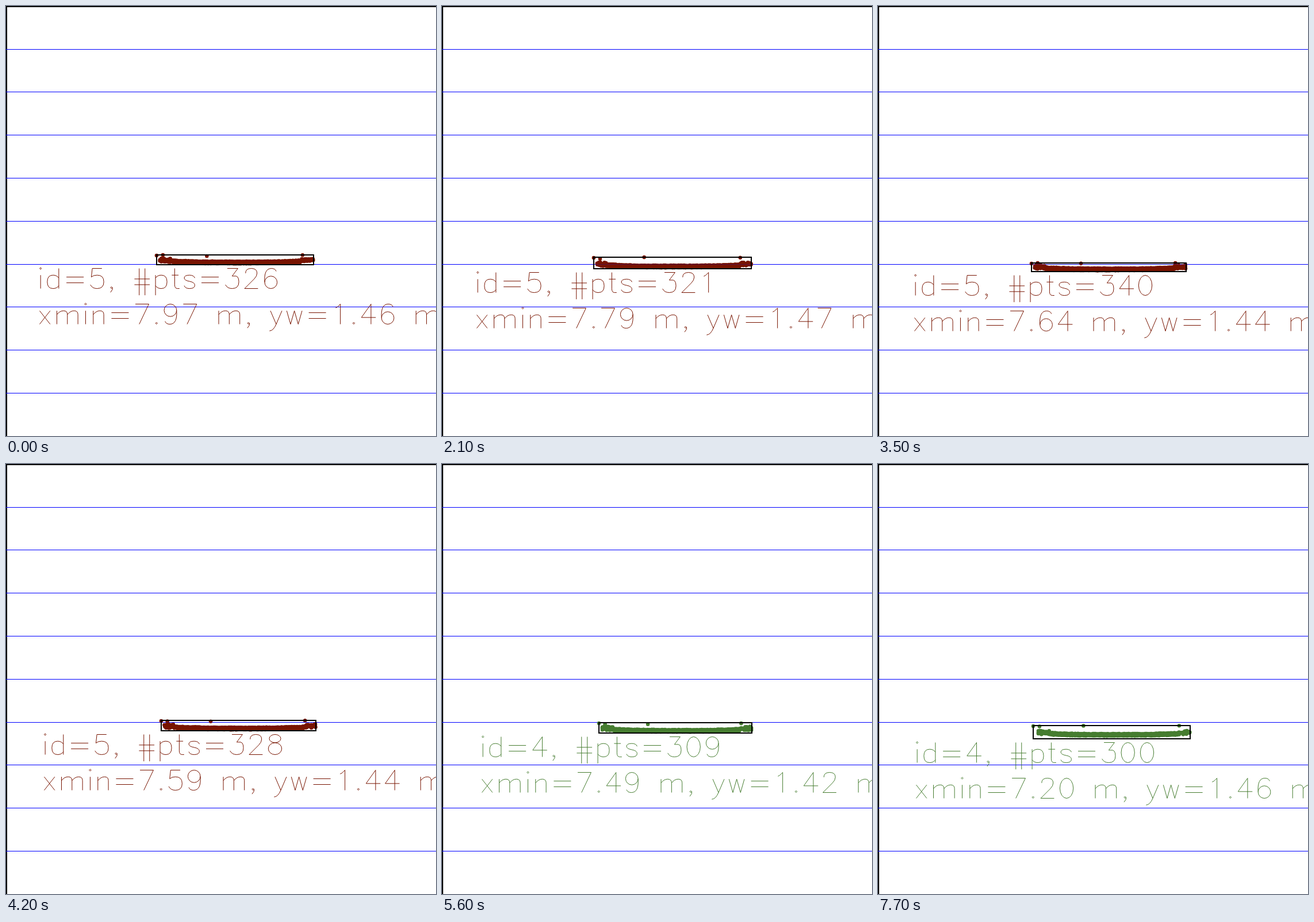
These frames come from a looping animation (748 px wide and 748 px high, 8 s). An HTML page with a canvas:

```html
<!DOCTYPE html>
<html lang="en">
<head>
<meta charset="utf-8">
<title>Lidar top view</title>
<style>
html, body { margin: 0; width: 100%; height: 100%; overflow: hidden; background: #fff; }
canvas { display: block; }
</style>
</head>
<body>
<canvas id="view" width="748" height="748"></canvas>
<script>
const SIZE = 748, STEP = 700, LOOP = 8000, RADIUS = 3.3, TEXT_SCALE = 1.666;
const canvas = document.getElementById('view');
const ctx = canvas.getContext('2d');

// Single-stroke lettering: baseline at y = 0, capitals 21 units high.
const oval = (x, y, rx, ry = rx) =>
  `M${x - rx} ${y}a${rx} ${ry} 0 1 0 ${2 * rx} 0a${rx} ${ry} 0 1 0 ${-2 * rx} 0`;
const diamond = y => `M5 ${y}l-1 1 1 1 1-1z`;
const stem = 'M4-14V0';
const arch = stem + 'M4-10Q7-14 11-14Q15-14 15-10V0';
const hook = 'Q17-14 17-7Q17 0 10 0Q5 0 3-4';
const digits = [
  oval(10, -10.5, 7, 10.5),
  'M6-17L8-18L11-21V0',
  'M4-16Q4-21 10-21T16-16Q16-13 13-10L3 0H17',
  'M5-21H16L10-13H12' + hook,
  'M13-21L3-7H18M13-21V0',
  'M15-21H5L4-12Q6-14 10-14' + hook,
  oval(10.5, -6.5, 6.5) + 'M4-6.5Q3-21 11-21Q15-21 16-18',
  'M3-21H17L7 0',
  oval(10, -16.7, 6, 4.3) + oval(10, -6.2, 7, 6.2),
  oval(9.5, -14.5, 6.5) + 'M16-14.5Q17 0 9 0Q5 0 4-3'
];
const glyphs = {
  ' ': [16, ''],
  '.': [10, diamond(-2)],
  ',': [10, diamond(-2) + 'M6-1V1L4 4'],
  '=': [26, 'M4-12H22M4-6H22'],
  '#': [21, 'M8-21V7M14-21V7M3-10H19M3-4H19'],
  d: [19, 'M15-21V0M15-11Q13-14 9-14Q3-14 3-7Q3 0 9 0Q13 0 15-3'],
  i: [8, diamond(-22).replace('5', '4') + stem],
  m: [30, arch + 'M15-10Q18-14 22-14Q26-14 26-10V0'],
  n: [19, arch],
  p: [19, 'M4-14V7M4-11Q6-14 10-14Q16-14 16-7Q16 0 10 0Q6 0 4-3'],
  s: [17, 'M14-11Q13-14 8.5-14Q3-14 3-11Q3-8.5 8.5-7.5T14-3.5Q14 0 8.5 0Q4 0 3-3'],
  t: [12, 'M5-21V-4Q5 0 8 0H10M2-14H9'],
  w: [22, 'M3-14L7 0L11-14L15 0L19-14'],
  x: [17, 'M3-14L14 0M14-14L3 0'],
  y: [16, 'M2-14L8 0M14-14L8 0Q5 7 1 7']
};
digits.forEach((path, n) => { glyphs[n] = [20, path]; });
for (const key in glyphs) glyphs[key][1] = new Path2D(glyphs[key][1]);

// Key scans; the steps between them are interpolated.
const keys = [
  { step: 0, left: 262, height: 17, count: 326, xmin: 7.97, yw: 1.46 },
  { step: 1, left: 265, height: 16, count: 338, xmin: 7.91, yw: 1.46 },
  { step: 3, left: 264, height: 20, count: 321, xmin: 7.79, yw: 1.47 },
  { step: 5, left: 267, height: 15, count: 340, xmin: 7.64, yw: 1.44 },
  { step: 7, left: 272, height: 20, count: 315, xmin: 7.55, yw: 1.44 },
  { step: 9, left: 273, height: 16, count: 302, xmin: 7.43, yw: 1.41 },
  { step: 11, left: 270, height: 23, count: 300, xmin: 7.20, yw: 1.46 }
];

function scanAt(step) {
  const next = keys.findIndex(k => k.step >= step);
  const b = keys[next], a = keys[Math.max(0, next - 1)];
  const f = a === b ? 0 : (step - a.step) / (b.step - a.step);
  const mix = name => a[name] + (b[name] - a[name]) * f;
  const xmin = mix('xmin'), yw = mix('yw');
  const left = Math.round(mix('left')), height = Math.round(mix('height'));
  const width = Math.round(187 * yw - 0.5);
  const bottom = Math.round(450.3 + (7.97 - xmin) * 36.3);
  return { left, width, height, bottom, xmin, yw, top: bottom - height, count: Math.round(mix('count')) };
}

function random(seed) {
  return () => (seed = (seed * 16807) % 2147483647) / 2147483647;
}

function dot(x, y) {
  ctx.beginPath();
  ctx.arc(x, y, RADIUS, 0, 7);
  ctx.fill();
}

function grid(alpha) {
  ctx.fillStyle = `rgba(0,0,255,${alpha})`;
  for (let i = 1; i < 10; i++) ctx.fillRect(0, Math.floor(i * SIZE / 10 + 0.3), SIZE, 1);
}

function write(text, x, y) {
  ctx.save();
  ctx.translate(x + 0.5, y + 0.5);
  ctx.scale(TEXT_SCALE, TEXT_SCALE);
  ctx.lineWidth = 1 / TEXT_SCALE;
  for (const char of text) {
    const [width, path] = glyphs[char];
    ctx.stroke(path);
    ctx.translate(width, 0);
  }
  ctx.restore();
}

// Shallow rows of returns that bend away and scatter towards both ends
function cloud(s, seed) {
  const rnd = random(seed), rows = 3, cols = Math.round(s.count / rows);
  const lift = Math.max(0, s.height - 20), inset = 6 + lift;
  for (let r = 0; r < rows; r++) {
    for (let c = 0; c < cols; c++) {
      const u = c / (cols - 1), end = Math.abs(2 * u - 1);
      const scatter = rnd() * (end > 0.85 ? 3.5 : 0.8);
      const x = s.left + inset + u * (s.width - inset - 1) + rnd() - 0.5;
      dot(x, s.bottom - 5.2 - lift + r * 1.7 - 3.2 * end ** 3 - scatter);
    }
  }
  dot(s.left, s.top + 1);
  for (const u of [0.04, 0.32, 0.93]) dot(s.left + u * s.width, s.top + rnd() * 3);
}

function draw(step) {
  const s = scanAt(step), id = step < 7 ? 5 : 4;
  ctx.fillStyle = '#fff';
  ctx.fillRect(0, 0, SIZE, SIZE);
  ctx.fillStyle = '#000';
  ctx.fillRect(0, 0, SIZE, 2);
  ctx.fillRect(0, 0, 2, SIZE);
  grid(1);
  ctx.fillStyle = ctx.strokeStyle = id === 5 ? '#781400' : '#467d30';
  cloud(s, 991 + step * 7919);
  write(`id=${id}, #pts=${s.count}`, s.left - 209, s.bottom + 41);
  write(`xmin=${s.xmin.toFixed(2)} m, yw=${s.yw.toFixed(2)} m`, s.left - 209, s.bottom + 103);
  grid(0.25);
  ctx.strokeStyle = '#000';
  ctx.lineWidth = 2;
  ctx.strokeRect(s.left, s.top, s.width, s.height);
}

let shown = -1;
function tick() {
  const step = Math.floor(performance.now() % LOOP / STEP);
  if (step !== shown) draw(shown = step);
  requestAnimationFrame(tick);
}
tick();
</script>
</body>
</html>
```
